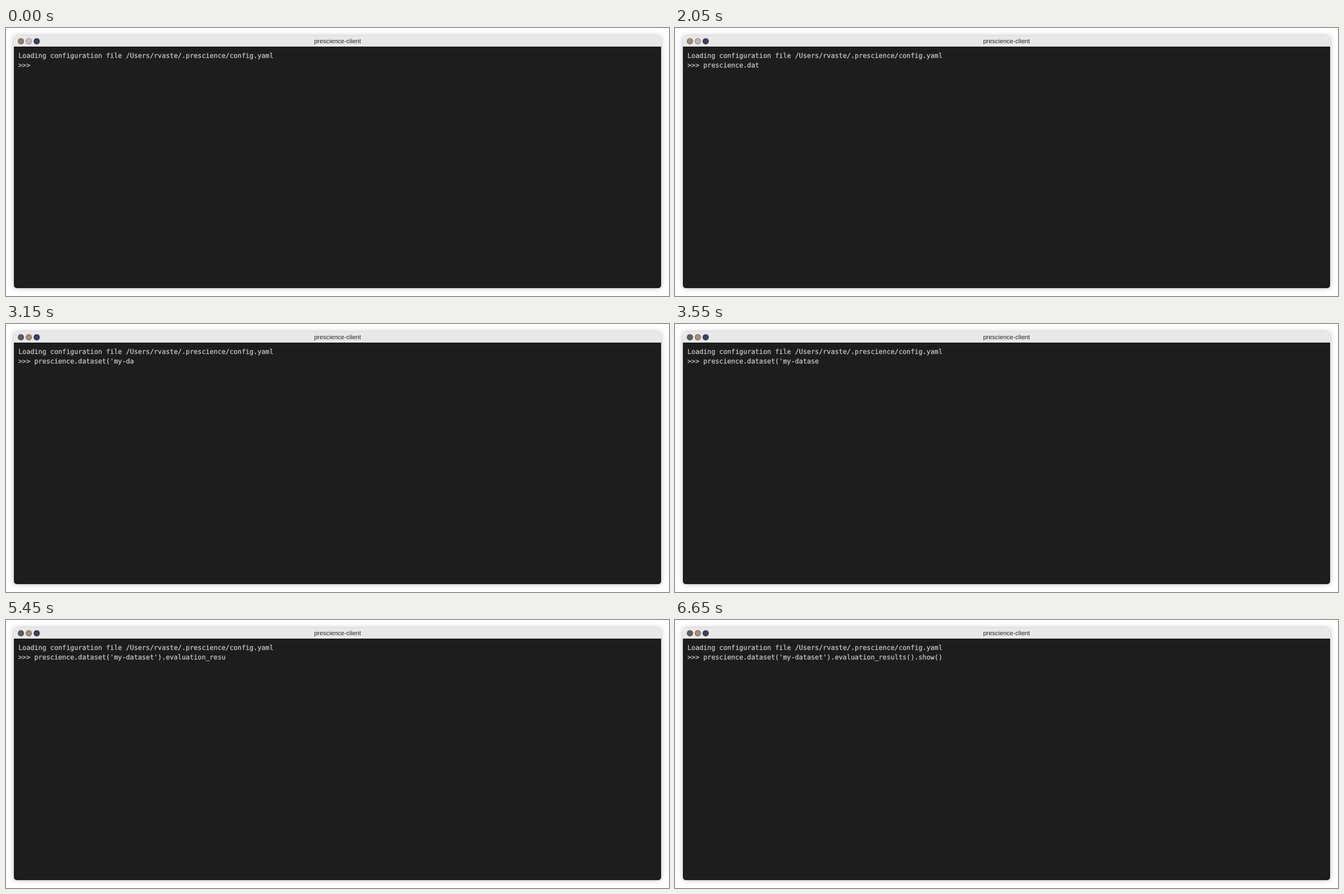
An HTML page for the animation above (8 s loop, 1177 px wide and 476 px high).

```html
<!DOCTYPE html>
<html lang="en">
<head>
<meta charset="utf-8">
<title>prescience-client</title>
<style>
  html, body {
    margin: 0;
    width: 100%;
    height: 100%;
    overflow: hidden;
    background: #fff;
  }
  .window {
    position: absolute;
    left: 14px;
    top: 14px;
    width: 1149px;
    height: 448px;
    border-radius: 5px;
    background: linear-gradient(#e8e8e8 19px, #1d1d1d 19px);
    box-shadow: 0 0 10px rgba(0, 0, 0, .27);
    text-rendering: geometricPrecision;
  }
  .bar {
    height: 19px;
    color: #24242c;
    font: 11.1px/20px "Liberation Sans", Arial, sans-serif;
    text-align: center;
  }
  .dot {
    position: absolute;
    top: 4px;
    width: 11px;
    height: 11px;
    box-sizing: border-box;
    border: 1px solid rgba(40, 40, 40, .35);
    border-radius: 50%;
    animation: 8s step-end infinite;
  }
  .close { left: 6.5px; background: #94806b; animation-name: close; }
  .min { left: 20.5px; background: #c5c2bd; animation-name: min; }
  .max { left: 34.5px; background: #3c4060; }
  .line {
    position: absolute;
    left: 8px;
    height: 17px;
    color: #c4c4c4;
    font: 11.76px/17px "DejaVu Sans Mono", monospace;
    -webkit-text-stroke: .3px #c4c4c4;
    white-space: pre;
  }
  .log { top: 27px; }
  .prompt { top: 44px; }
  .typed {
    position: absolute;
    left: 4ch;
    top: 0;
    width: 0;
    overflow: hidden;
    animation: type 8s infinite;
  }
  /* one character every 100 ms, from 1250 ms to 6650 ms */
  @keyframes type {
    0% { width: 0; animation-timing-function: step-end; }
    15.625% { width: 6ch; animation-timing-function: steps(54, end); }
    83.125%, 100% { width: 60ch; }
  }
  @keyframes close {
    0% { background: #94806b; }
    15.625% { background: #a08d75; }
    38.125%, 100% { background: #5d5d5d; }
  }
  @keyframes min {
    0% { background: #c5c2bd; }
    15.625% { background: #beb7af; }
    26.875%, 100% { background: #a58d76; }
  }
</style>
</head>
<body>
<div class="window">
  <div class="bar">prescience-client</div>
  <i class="dot close"></i>
  <i class="dot min"></i>
  <i class="dot max"></i>
  <div class="line log">Loading configuration file /Users/rvaste/.prescience/config.yaml</div>
  <div class="line prompt">&gt;&gt;&gt; <span class="typed">prescience.dataset('my-dataset').evaluation_results().show()</span></div>
</div>
</body>
</html>
```
